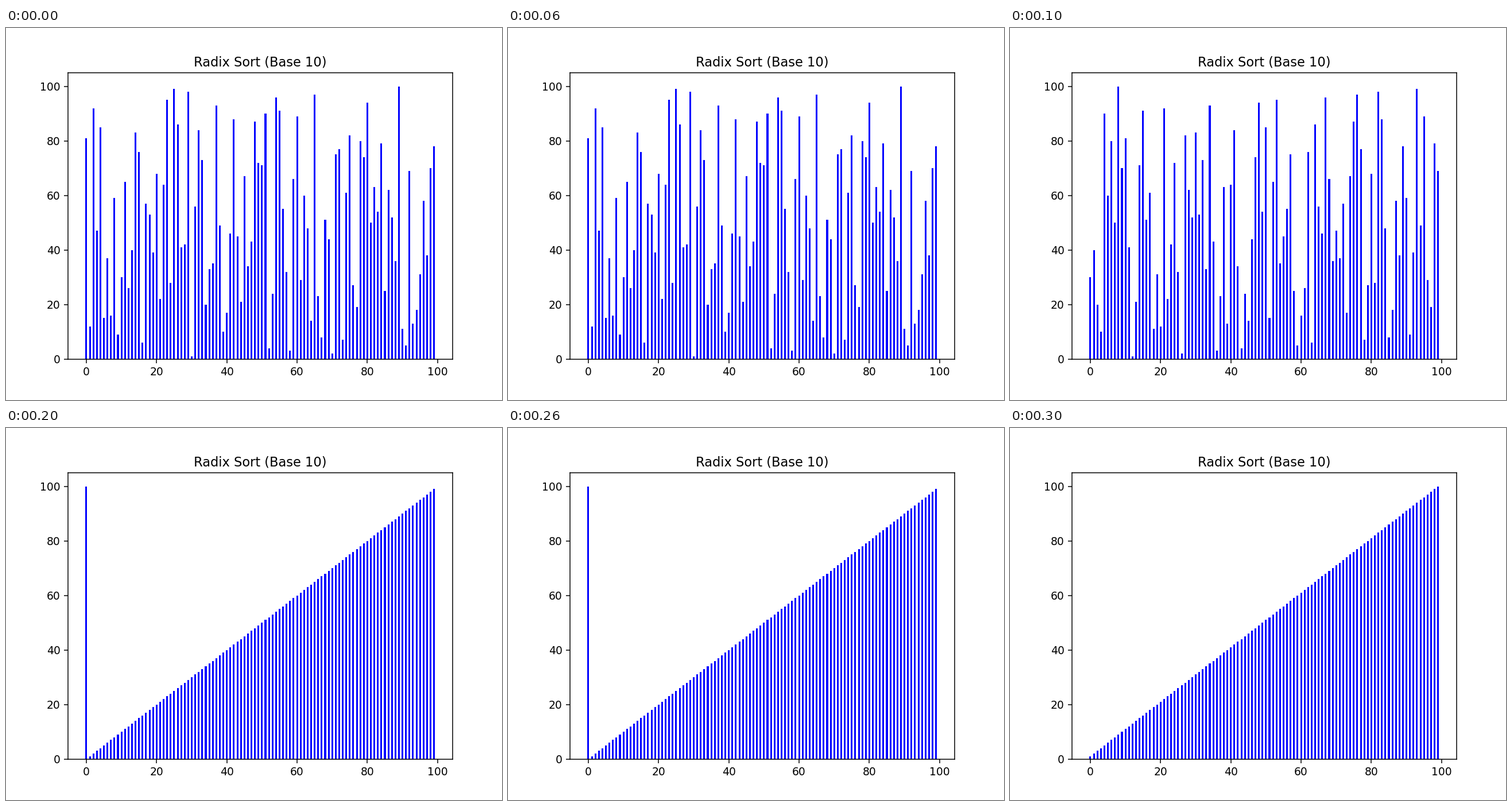
A matplotlib script for the animation above (400 ms loop, 864 by 648 pixels).

```python
import matplotlib.pyplot as plt
from matplotlib.animation import FuncAnimation

BASE = 10
START = [
    81, 12, 92, 47, 85, 15, 37, 16, 59, 9, 30, 65, 26, 40, 83, 76, 6, 57, 53, 39,
    68, 22, 64, 95, 28, 99, 86, 41, 42, 98, 1, 56, 84, 73, 20, 33, 35, 93, 49, 10,
    17, 46, 88, 45, 21, 67, 34, 43, 87, 72, 71, 90, 4, 24, 96, 91, 55, 32, 3, 66,
    89, 29, 60, 48, 14, 97, 23, 8, 51, 44, 2, 75, 77, 7, 61, 82, 27, 19, 80, 74,
    94, 50, 63, 54, 79, 25, 62, 52, 36, 100, 11, 5, 69, 13, 18, 31, 58, 38, 70, 78,
]


def radix_passes(values):
    """Return the list before sorting and after each digit pass."""
    states = [list(values)]
    place = 1
    while place <= max(values):
        # sorted() is stable, so it acts like filling the digit buckets in turn
        states.append(sorted(states[-1], key=lambda v: v // place % BASE))
        place *= BASE
    return states


STATES = radix_passes(START)

plt.rcParams["font.family"] = "DejaVu Sans"
fig, ax = plt.subplots(figsize=(6.4, 4.8), dpi=135)
bars = ax.bar(range(len(START)), START, width=0.5, color="blue")
ax.set_title(f"Radix Sort (Base {BASE})")
ax.set_ylim(0, 105)


def update(i):
    for bar, height in zip(bars, STATES[i % len(STATES)]):
        bar.set_height(height)
    return bars.patches


anim = FuncAnimation(fig, update, frames=len(STATES), interval=100,
                     repeat=True, repeat_delay=0, blit=False)
plt.show()
```
